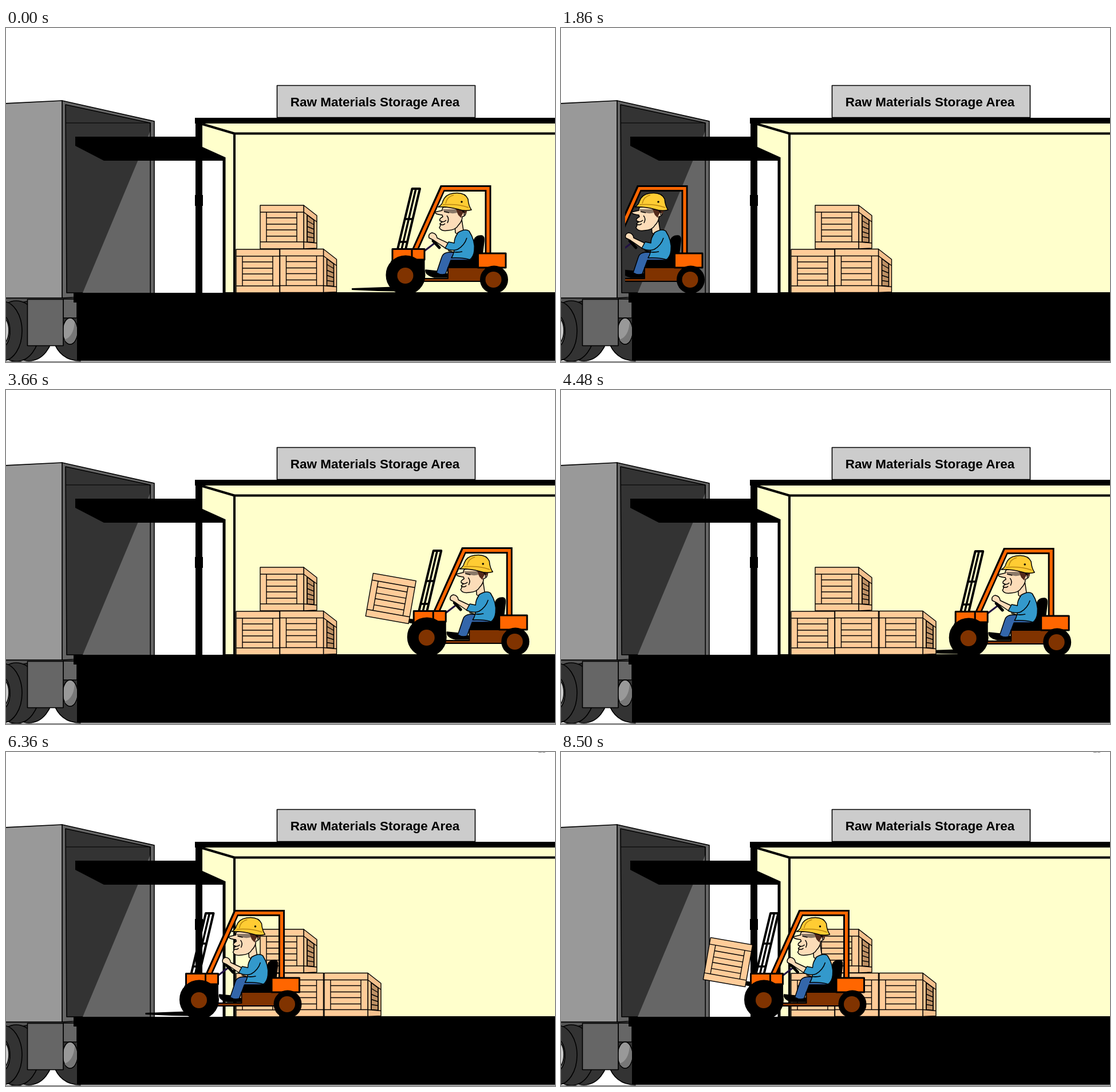
An HTML page that plays this animation: 959x584 px, repeating every 8.52 s.

```html
<!DOCTYPE html>
<html>
<head>
<meta charset="utf-8">
<style>
html, body { margin: 0; width: 100%; height: 100%; overflow: hidden; background: #fff; }
svg { display: block; }
text { font-family: "Liberation Sans", Arial, sans-serif; }
</style>
</head>
<body>
<svg width="959" height="584" viewBox="0 0 959 584" stroke-linejoin="round">
  <defs>
    <clipPath id="inside"><path d="M112 0H959V584H112Z"/></clipPath>
    <g id="front" stroke="#000" stroke-width="1.4" fill="none">
      <path d="M0 0H76V76H0Z" fill="#fc9"/>
      <path d="M0 12H76M0 64H76M11 12V64M64 12V64M11 22H64M11 33H64M11 43H64M11 54H64"/>
    </g>
    <g id="side" stroke="#000" stroke-width="1.4" fill="none">
      <path d="M76 0L99 18V75L76 76Z" fill="#f3c08d"/>
      <path d="M82 17L94 26V65L82 64Z" fill="#bd9064"/>
      <path d="M76 12L99 29M76 64L99 66M82 17V64M94 26V65M82 27L94 34M82 37L94 42M82 46L94 50M82 55L94 57"/>
    </g>
    <g id="crate"><use href="#side"/><use href="#front"/></g>
  </defs>

  <!-- warehouse -->
  <path d="M342 162H959V463H383V226L342 209Z" fill="#ffc"/>
  <path d="M330 157H959V167H343V463H331V167H330Z"/>
  <path d="M330 292H344V311H330Z"/>
  <path d="M343 168L399 184.5H959M399 184V463" fill="none" stroke="#000" stroke-width="4"/>
  <path d="M381 226V463" stroke="#000" stroke-width="5"/>
  <rect x="473.5" y="100.5" width="346" height="56" fill="#ccc" stroke="#000" stroke-width="1.6"/>
  <text x="644.5" y="136.5" font-size="22.5" font-weight="bold" text-anchor="middle">Raw Materials Storage Area</text>

  <!-- trailer -->
  <g stroke="#000" stroke-width="1.6">
    <path d="M98 127L259 163V464L98 472Z" fill="#666"/>
    <path d="M104 134L252 166V463H106Z" fill="#333"/>
    <path d="M252 180V463H134Z" fill="#666" stroke="none"/>
    <path d="M105 166H252V463" fill="none" stroke-width="1.2"/>
    <path d="M-2 132L98 127V472H-2Z" fill="#999"/>
    <path d="M0 474H124V487H0Z" fill="#555" stroke="none"/>
    <ellipse cx="40" cy="530" rx="42" ry="52" fill="#333"/>
    <ellipse cx="18" cy="530" rx="40" ry="53" fill="#333"/>
    <ellipse cx="-6" cy="530" rx="34" ry="52" fill="#333"/>
    <ellipse cx="-6" cy="530" rx="13" ry="27" fill="#666"/>
    <ellipse cx="-5" cy="529" rx="10" ry="22" fill="#ccc"/>
    <path d="M82 545Q94 582 130 582V500H100Z" fill="#333"/>
    <path d="M100 474H124V507H100Z" fill="#666"/>
    <ellipse cx="112" cy="530" rx="13" ry="23" fill="#999"/>
    <path d="M102 545Q118 540 120 514Q129 530 120 547Q111 558 102 545Z" fill="#777" stroke="none"/>
    <path d="M37.5 474.5H100V555.5H37.5Z" fill="#666"/>
    <path d="M0 473H124" fill="none"/>
  </g>
  <path d="M121 190H341V207L383 226V232H171L121 206Z"/>
  <path d="M118 463H383V462H959V582H124V480H118Z"/>
  <path d="M0 583.5H959" stroke="#555"/>

  <use href="#crate" x="402" y="387"/>
  <use href="#crate" x="478.5" y="386.5"/>
  <use href="#crate" x="444" y="310"/>

  <g clip-path="url(#inside)"><g class="drive">
    <path id="fork" d="M604 455L690 452L702 461L650 460L604 458Z"/>
  </g></g>
  <use id="placed" href="#crate" x="556" y="386.5"/>

  <g clip-path="url(#inside)"><g class="drive">
    <g id="load"><use id="loadSide" href="#side" x="-38" y="-38"/><use href="#front" x="-38" y="-38"/></g>

    <!-- mast -->
    <g fill="none" stroke="#000">
      <path d="M684 387L709.5 281H723L698 387" stroke-width="4"/>
      <path d="M691 387L716 281M697 334H711M688 374H702" stroke-width="3.5"/>
    </g>

    <!-- driver -->
    <g stroke="#000" stroke-width="1.5">
      <path d="M818 370Q821 362 831 363Q836 364 835 373L831 406L826 419H773L778 404H812Z"/>
      <path d="M733 423L752 425L771 430V436H748Q732 432 733 423Z"/>
      <path d="M813 393L774 392Q763 393 761 401L752 428Q760 433 768 430L777 406H810Q818 404 813 393Z" fill="#36a"/>
      <path d="M784 345L785 358L794 364L799 354L796 334Z" fill="#fcdcb8"/>
      <path d="M764 313Q761 317 762 319L749 322Q750 326 762 327L763 330Q756 334 758 337L762 339L758 342Q760 345 757 349Q760 356 772 354Q786 353 790 345Q797 338 797 330Q805 328 803 319L799 314Z" fill="#fcdcb8"/>
      <path d="M785 316H806L804 325Q798 319 795 332L790 327Z" fill="#532a1c" stroke="none"/>
      <path d="M762 317L786 317L788 323Q778 326 766 321Z" fill="#8a7868" stroke="none"/>
      <path d="M765 321L774 323M758 337Q764 341 769 336M758 343Q763 346 767 342M770 328Q775 333 771 341M797 321Q802 320 800 327" fill="none"/>
      <path d="M755 313Q762 309 763 303Q767 291 781 289Q801 286 807 299Q808 311 813 318Q802 321 790 317Q770 312 755 313Z" fill="#fc3"/>
      <path d="M768 307Q770 295 782 292M763 309Q788 307 808 314" fill="none" stroke="#b98512"/>
      <circle cx="796" cy="304" r="1"/>
      <path d="M789 358Q802 350 809 355Q820 372 818 389Q817 400 810 405Q796 401 778 402Q784 393 783 380Z" fill="#39c"/>
      <path d="M749 376L728 392" stroke="#214" stroke-width="3"/>
      <path d="M746 372L757 384" stroke-width="5" stroke-linecap="round"/>
      <path d="M772 376L753 367Q752 359 744 358Q737 360 739 367L747 371L769 386Z" fill="#fcdcb8"/>
      <path d="M789 359Q783 367 783 376L773 374L767 385Q779 391 789 387Q801 380 805 367" fill="#39c"/>
      <path d="M772 389Q784 394 797 391" fill="none"/>
    </g>

    <!-- body -->
    <g stroke="#000" stroke-width="3">
      <path d="M715 387L762.5 280.5H842V394" fill="none" stroke-width="11" stroke-linejoin="miter"/>
      <path d="M715.5 386L763 280.5H842V394" fill="none" stroke="#f60" stroke-width="5.2" stroke-linejoin="miter"/>
      <path d="M772 419H838V443H730V438H772Z" fill="#803300" stroke-width="2"/>
      <path d="M674 408L730 406V425H668Z"/>
      <path d="M675 386.5H709V409H675ZM709 386.5H731V405H709Z" fill="#f60"/>
      <path d="M824.5 394H873V419H824.5Z" fill="#f60"/>
      <circle cx="698" cy="432" r="33"/>
      <circle cx="697.5" cy="433" r="14" fill="#803300" stroke="none"/>
      <circle cx="852.5" cy="440" r="23"/>
      <circle cx="851.5" cy="440" r="14" fill="#803300" stroke="none"/>
    </g>
  </g></g>

  <path id="specks" d="M930 0H936M937 0H942" stroke="#888" stroke-width="2"/>
  <g id="tip">
    <rect x="928.5" y="3.5" width="60" height="30" rx="1" fill="#f4f4f4" stroke="#ccc"/>
    <path d="M929 34H959" stroke="#bbb"/>
    <text x="938" y="24.5" font-size="18" stroke="#000" stroke-width=".4">factory</text>
  </g>
</svg>
<script>
const LOOP = 8520, PLACED = 4220;
// [time, forklift offset]
const path = [
  [0, 0], [440, -35], [880, -147], [1300, -420], [1600, -610], [1700, -626], [1880, -626],
  [2100, -545], [2960, -199], [3440, 11], [3800, 43], [PLACED, -32], [4480, 14], [4900, 100],
  [5160, 84], [5800, -110], [6360, -360], [6800, -610], [7000, -654], [7840, -654],
  [8000, -592], [LOOP, -334]
];
const $ = id => document.getElementById(id);
const drives = document.querySelectorAll('.drive');
const clamp = v => Math.max(0, Math.min(1, v));
const show = (id, on) => { $(id).style.display = on ? '' : 'none'; };

const secant = i => (path[i + 1][1] - path[i][1]) / (path[i + 1][0] - path[i][0]);
const slopes = path.map((_, i) => {
  if (i === 0) return 0;
  if (i === path.length - 1) return secant(i - 1);
  const a = secant(i - 1), b = secant(i);
  return a * b > 0 ? 2 * a * b / (a + b) : 0;
});

// monotone cubic through the path points
function position(t) {
  let i = 0;
  while (i < path.length - 2 && t >= path[i + 1][0]) i++;
  const [t0, a] = path[i], [t1, b] = path[i + 1], h = t1 - t0;
  const u = (t - t0) / h, v = 1 - u;
  return v * v * (1 + 2 * u) * a + u * u * (1 + 2 * v) * b
    + u * v * h * (v * slopes[i] - u * slopes[i + 1]);
}

function draw(t) {
  const second = t >= PLACED;
  const loaded = second ? t >= 7000 : t >= 1700;
  const lift = !loaded ? 0 : second ? 1 : clamp((4000 - t) / 300);
  const move = `translate(${position(t)} ${second ? 1 : 0})`;
  drives.forEach(g => g.setAttribute('transform', move));
  $('fork').setAttribute('transform', `translate(0 ${-50 * lift}) rotate(${10 * lift} 685 458)`);
  $('load').setAttribute('transform',
    `translate(${626 + 9 * lift} ${424.5 - (second ? 58 : 60) * lift}) rotate(${10 * lift}) scale(${second ? 0.98 : 1})`);
  show('load', loaded);
  show('loadSide', lift === 0);
  show('placed', second);
  show('specks', t >= 6100);
  show('tip', t >= 6620 && t < 8180);
}

function tick() {
  draw(performance.now() % LOOP);
  requestAnimationFrame(tick);
}
tick();
</script>
</body>
</html>
```
